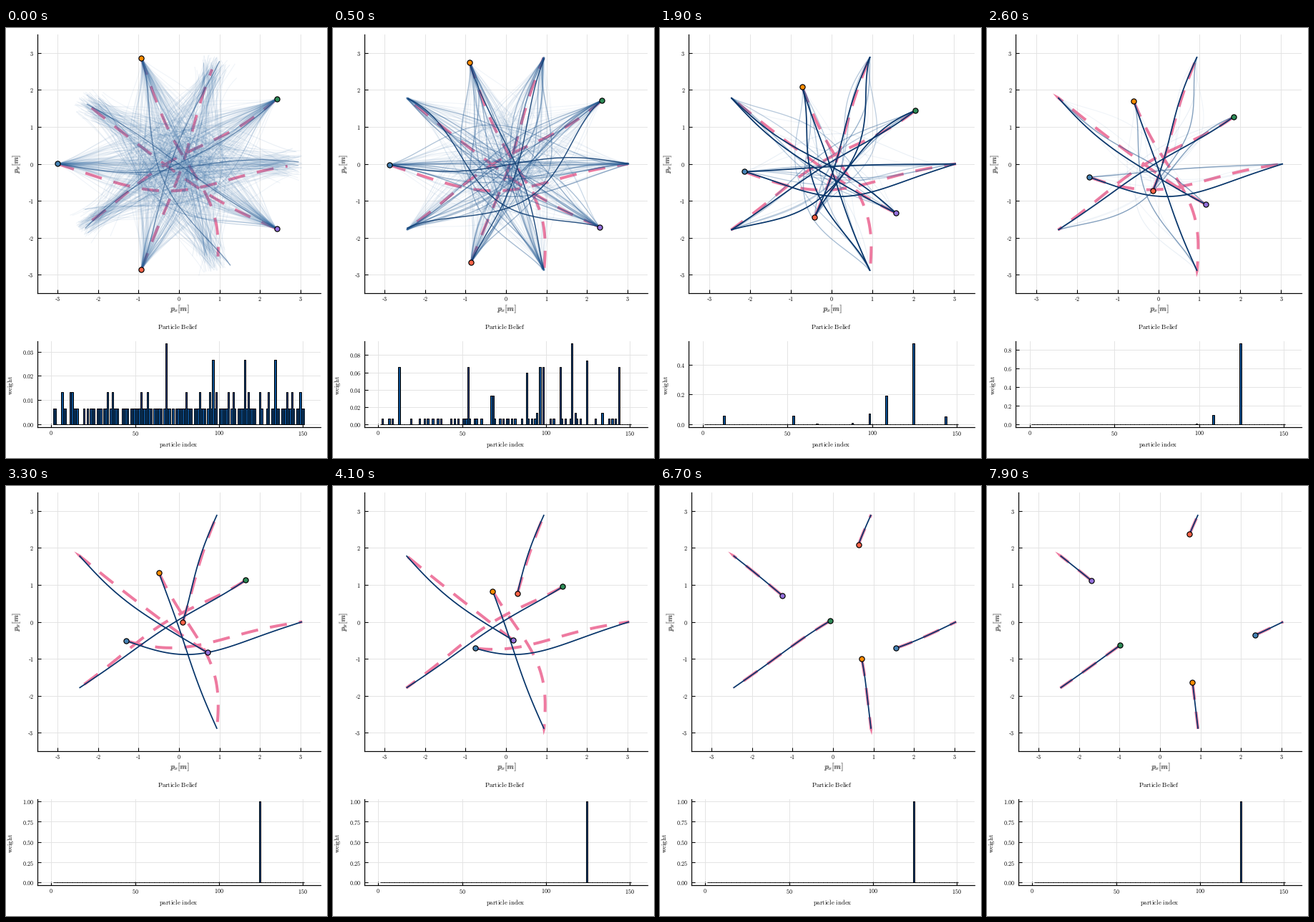
Animation of 449x600 px, one loop 8000 ms. Source, as a matplotlib script:

```python
import numpy as np
import matplotlib.pyplot as plt
from matplotlib.animation import FuncAnimation
from matplotlib.collections import LineCollection
from matplotlib.colors import to_rgb

W, H, DPI = 449, 600, 64
PX = 72 / DPI  # points per pixel
FRAMES, STEP = 80, 0.1
PALE, NAVY = np.array(to_rgb("#3f78b0")), np.array(to_rgb("#07356a"))
PINK, BAR = "#ee7aa0", "#0d4f90"
N, BEST = 150, 124
U = np.linspace(0, 1, 45)

plt.rcParams.update({
    "font.family": "Liberation Serif",
    "mathtext.fontset": "cm",
    "axes.linewidth": 1.2 * PX,
    "axes.axisbelow": True,
})
rng = np.random.default_rng(4)


def smoothstep(x):
    x = np.clip(x, 0, 1)
    return x * x * (3 - 2 * x)


def hermite(x, xs, ys):
    """Smooth cubic through the keys, starting at rest."""
    m = np.gradient(ys, xs)
    m[0] = 0
    i = np.clip(np.searchsorted(xs, x, side="right") - 1, 0, len(xs) - 2)
    h = xs[i + 1] - xs[i]
    u = (x - xs[i]) / h
    return (ys[i] + smoothstep(u) * (ys[i + 1] - ys[i])
            + u * (1 - u) * h * ((1 - u) * m[i] - u * m[i + 1]))


def wave(s, bends):
    """Sum of three sines through the bends at 1/4, 1/2 and 3/4 of the way."""
    k = np.arange(1, 4) * np.pi
    amps = np.linalg.solve(np.sin(np.outer([0.25, 0.5, 0.75], k)), bends)
    return np.sin(np.multiply.outer(s, k)) @ amps


class Agent:
    """Crosses the circle; paths are offsets from the straight line."""

    times = np.array([0, 1.3, 2.6, 4.1, 5.5, 7.9])

    def __init__(self, k, color, progress, belief, plan, final, tip=False):
        self.color, self.tip = color, tip
        angle = np.pi - k * 2 * np.pi / 5
        self.start = 3 * np.array([np.cos(angle), np.sin(angle)])
        self.axis = -2.015 * self.start
        self.goal = self.start + self.axis
        self.normal = np.array([-self.axis[1], self.axis[0]]) / np.hypot(*self.axis)
        self.keys = np.array([0, 0.4 * progress[0], *progress])
        self.belief, self.plan, self.final = belief, plan, final

    def progress(self, t):
        return hermite(t, self.times, self.keys)

    def offset(self, s, t, bends):
        mix = smoothstep((t - 4.2) / 0.9)
        return (1 - mix) * wave(s, bends) + mix * wave(s, self.final)

    def point(self, s, off):
        s, off = np.asarray(s)[..., None], np.asarray(off)[..., None]
        return self.start + s * self.axis + off * self.normal

    def state(self, t):
        s = self.progress(t)
        return s, self.offset(s, t, self.belief)

    def believed(self, t):
        s = self.progress(t) + (1 - self.progress(t)) * U
        return self.point(s, self.offset(s, t, self.belief))

    def planned(self, t, end):
        s0, off0 = self.state(t)
        s = s0 + (end - s0) * U
        off = self.offset(s, t, self.plan)
        return self.point(s, off + (off0 - off[0]) * (1 - U) ** 3)

    def guessed(self, t, bow, sway, drift, end):
        s0, off0 = self.state(t)
        bulge = bow * np.sin(np.pi * U) ** 1.6 + sway * np.sin(2 * np.pi * U)
        off = off0 * (1 - U) + (1 - s0) * bulge + drift * U ** 4
        return self.point(s0 + (end - s0) * U, off)


agents = [
    Agent(0, "#4682b4", (0.215, 0.371, 0.606, 0.884), (-0.44, -0.88, -0.57),
          (-0.53, -0.72, -0.34), (-0.44, -0.90, -0.72)),
    Agent(1, "#ff8c00", (0.197, 0.349, 0.564, 0.796), (-0.06, -0.05, -0.07),
          (0.0, 0.20, 0.40), (0.0, 0.35, 0.31), tip=True),
    Agent(2, "#2e8b57", (0.126, 0.216, 0.340, 0.691), (0.05, -0.05, -0.03),
          (0.04, -0.17, -0.12), (0.05, -0.06, -0.05)),
    Agent(3, "#9370db", (0.236, 0.423, 0.619, 0.831), (0.22, 0.32, 0.30),
          (0.22, 0.23, 0.14), (0.22, 0.29, 0.15), tip=True),
    Agent(4, "#ff6347", (0.374, 0.631, 0.785, 0.906), (-0.05, -0.09, 0.03),
          (-0.05, -0.09, 0.0), (-0.05, -0.09, 0.03)),
]

# Particle filter: each weight fades at its own rate, shares are renormalised
RIVALS = {124: (2, 0), 108: (2, 0.22), 98: (2, 0.42), 12: (2, 0.48), 53: (2, 0.48),
          143: (2, 0.5), 88: (2, 0.8), 67: (1, 0.7), 115: (4, 2.5), 96: (4, 4),
          68: (5, 9), 133: (4, 12)}
count = np.ones(N)
fade = rng.uniform(9, 20, N)
for i, (c, f) in RIVALS.items():
    count[i - 1], fade[i - 1] = c, f
others = rng.permutation([i for i in range(N) if i + 1 not in RIVALS])
count[others[:12]] = 2
count[others[12:12 + int(count.sum()) - N]] = 0
rounding = rng.uniform(0.1, 0.9, N)

bow = np.clip(rng.normal(0, 0.55, (N, 5)), -1.1, 1.1)
sway = rng.normal(0, 0.15, (N, 5))
drift = rng.normal(0, 0.18, (N, 5))
cut = rng.uniform(0, 0.1, (N, 5))


def weights(t):
    if t > 3.15:
        return (np.arange(1, N + 1) == BEST).astype(float)
    share = count * np.exp(-fade * t ** 2.4)
    return np.floor(N * share / share.sum() + rounding) / N


def weight_ticks(top):
    """Tick step and number of decimals for a given maximum."""
    for limit, step, digits in ((0.045, 0.01, 2), (0.095, 0.02, 2), (0.125, 0.025, 3),
                                (0.3, 0.05, 2), (0.5, 0.1, 1), (0.999, 0.2, 1)):
        if top < limit:
            return step, digits
    return 0.25, 2


def rm(s):
    s = str(s)
    sign, body = ("-", s[1:]) if s.startswith("-") else ("", s)
    return sign + r"$\mathrm{" + body.replace(" ", r"\ ") + "}$"


fig = plt.figure(figsize=(W / DPI, H / DPI), dpi=DPI, facecolor="white")
top_ax, low_ax = fig.add_axes([0, 0, 1, 1]), fig.add_axes([0, 0, 1, 0.5])
for ax in (top_ax, low_ax):
    ax.set_facecolor("none")
    ax.spines[["top", "right"]].set_visible(False)
    ax.grid(color="#e2e2e2", lw=0.9 * PX)
    ax.tick_params(direction="in", length=5 * PX, width=1.1 * PX, labelsize=8.1 * PX)
    ax.tick_params(axis="x", pad=3 * PX)
    ax.tick_params(axis="y", pad=5 * PX)

units = range(-3, 4)
top_ax.set(xlim=(-3.5, 3.5), ylim=(-3.5, 3.5))
top_ax.set_xticks(units, [rm(v) for v in units])
top_ax.set_yticks(units, [rm(v) for v in units])
low_ax.set_xlim(-8.25, 160.6)
low_ax.set_xticks(range(0, 151, 50), [rm(v) for v in range(0, 151, 50)])


def label(s, y, size=8.9, **kw):
    kw = {"ha": "center", "va": "baseline", **kw}
    return fig.text(0, 1 - y / H, s, fontsize=size * PX, **kw)


title = label(rm("Particle Belief"), 420)
index_label = label(rm("particle index"), 584)
weight_label = label(rm("weight"), 498, rotation=90, va="center")
# The axis names are struck twice, one pixel apart
x_names = [label("$p_x[m]$", 392, 10.8, va="center", color="#555") for _ in range(2)]
y_names = [label("$p_y[m]$", 189 + d, 10.8, va="center", color="#555", rotation=90)
           for d in range(2)]

bundle = LineCollection([], zorder=2)
top_ax.add_collection(bundle, autolim=False)
plans, dots, tips = [], [], []
for a in agents:
    plans += top_ax.plot([], [], color=PINK, lw=4 * PX, ls=(0, (6, 4.25)), zorder=1)
    dots += top_ax.plot([], [], "o", color=a.color, ms=7.2 * PX, mec="black",
                        mew=1.2 * PX, zorder=4)
    tips += top_ax.fill([0, 0, 0], [0, 0, 0], color=PINK, lw=0, zorder=1)
bars = low_ax.bar(np.arange(1, N + 1), np.zeros(N), width=1, align="edge",
                  color=BAR, ec="black", lw=PX, zorder=2)


def place(digits):
    """Wider tick labels push the plots to the right."""
    left = 36.5 + 3.7 * digits
    for ax, y0, y1 in ((top_ax, 9, 370), (low_ax, 436.8, 556.8)):
        ax.set_position([left / W, 1 - y1 / H, (440 - left) / W, (y1 - y0) / H])
    mid = (left + 440) / 2
    title.set_x((mid - 1) / W)
    index_label.set_x((mid - 1) / W)
    weight_label.set_x((10 - 1.75 * digits) / W)
    for d in range(2):
        x_names[d].set_x((mid + d) / W)
        y_names[d].set_x((left - 29) / W)


def draw_weights(w):
    top = w.max()
    step, digits = weight_ticks(top)
    place(digits)
    for bar, h in zip(bars, w):
        bar.set_height(h)
    marks = np.arange(0, top * 1.02, step)
    low_ax.set_yticks(marks, [rm(f"{v:.{digits}f}") for v in marks])
    low_ax.set_ylim(-0.03 * top, 1.03 * top)


def draw_bundle(t, w, loose):
    ids = np.flatnonzero(w)
    ids = ids[np.argsort(w[ids], kind="stable")]  # heaviest on top
    lines = []
    for i in ids:
        for k, a in enumerate(agents):
            if i == BEST - 1:
                lines.append(a.believed(t))
            else:
                lines.append(a.guessed(t, bow[i, k], sway[i, k], drift[i, k] * loose,
                                       1 - cut[i, k] * loose))
    v = np.repeat(w[ids], len(agents))
    alpha = np.minimum(1, 0.04 + 5 * v + 0.4 * (v / w.max()) ** 6)[:, None]
    bundle.set_segments(lines)
    bundle.set_color(np.hstack([PALE + (NAVY - PALE) * alpha, alpha]))
    bundle.set_linewidth((1.1 + 0.65 * np.minimum(1, 5 * v)) * PX)


def draw_plans(t, loose):
    for a, plan, dot, tip in zip(agents, plans, dots, tips):
        path = a.planned(t, 1 - 0.06 * loose)
        plan.set_data(*path.T)
        dot.set_data(*a.point(*a.state(t))[:, None])
        # A dash that reaches the goal ends in a small spike
        run = np.hypot(*(np.diff(path, axis=0) * (56.5, 51.57)).T).sum()
        tip.set_visible(a.tip and t > 2 and run % 41 < 24)
        d = path[-1] - path[-2]
        d /= np.hypot(*d)
        side = np.array([-d[1], d[0]]) * 0.036
        tip.set_xy([a.goal + side, a.goal - side, a.goal + 0.17 * d])


def update(frame):
    t = frame * STEP
    loose = np.exp(-t / 0.2)
    w = weights(t)
    draw_weights(w)
    draw_bundle(t, w, loose)
    draw_plans(t, loose)
    return []


anim = FuncAnimation(fig, update, frames=FRAMES, interval=1000 * STEP,
                     init_func=lambda: [], repeat=True, blit=False)
plt.show()
```
